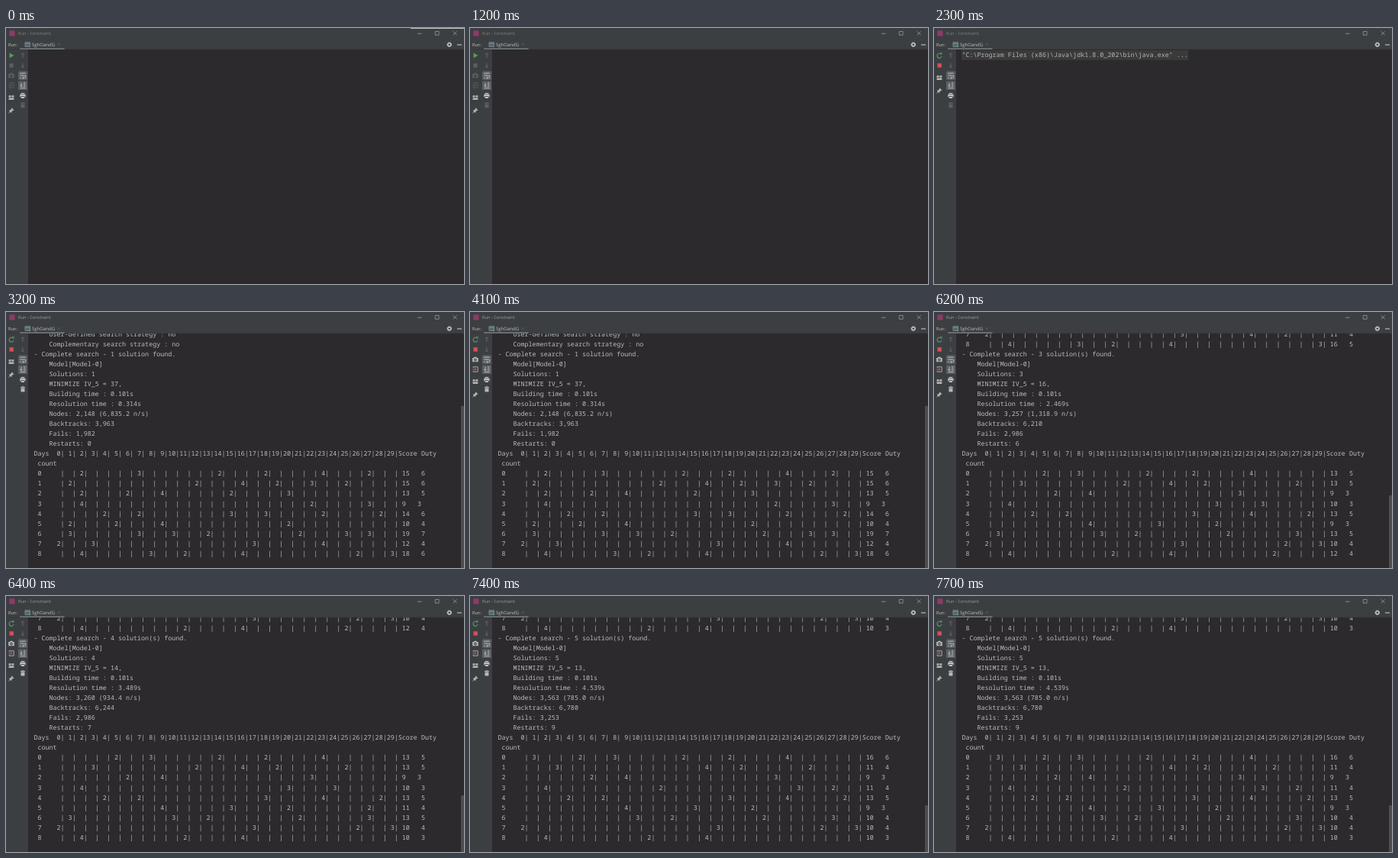
Animation, 600 px wide and 335 px high, one loop 8000 ms. Source, as an HTML page:

```html
<!DOCTYPE html>
<html lang="en">
<head>
<meta charset="utf-8">
<title>Run console</title>
<style>
  html, body { margin: 0; width: 100%; height: 100%; overflow: hidden; background: #3c3f42; }
  #stage { position: relative; width: 600px; height: 335px; overflow: hidden; background: #3c3f42; }
  #console { position: absolute; left: 29px; top: 28px; right: 0; bottom: 0; overflow: hidden; background: #2c2a2c; }
  pre {
    position: absolute; left: 7.4px; margin: 0; color: #bcbcbc;
    font: 8.385px/13.05px "Noto Sans Mono", "DejaVu Sans Mono", monospace;
    font-variant-ligatures: none; text-rendering: geometricPrecision;
  }
  #command { top: .5px; background: #3a3a3b; color: #b4b4b4; }
  .table { top: -5.3px; }
  .thumb { position: absolute; right: 0; bottom: 0; width: 4px; background: #4e4e4f; }
  svg { position: absolute; left: 0; top: 0; }
  text { font-family: "Open Sans", "Noto Sans", sans-serif; text-rendering: geometricPrecision; }
</style>
</head>
<body>
<div id="stage">
  <div id="console">
    <pre id="command" data-from="2300" data-to="3200">"C:\Program Files (x86)\Java\jdk1.8.0_202\bin\java.exe" ...</pre>
  </div>
  <svg width="600" height="335" viewBox="0 0 600 335" fill="none">
    <defs>
      <g id="arrow"><path d="M0 3.2V-3M-2.2 -.8L0 -3.1L2.2 -.8"/></g>
      <g id="camera" stroke="none">
        <path fill="currentColor" fill-rule="evenodd" d="M-3.8 -2h1.8l.8 -1.3h2.4l.8 1.3h1.8v5.2h-7.6zM0 -1.2a1.8 1.8 0 1 0 .01 0z"/>
        <circle cy=".6" r=".8" fill="currentColor"/>
      </g>
      <g id="layout" fill="currentColor" stroke="none">
        <path d="M-3.4 -2.8h3v2.6h-3zM.4 -2.8h3v2.6h-3zM-3.4 .5h6.8v2.5h-6.8z"/>
      </g>
      <g id="pin">
        <path fill="currentColor" stroke="none" d="M.6 -3.5L3.5 -.6L2.6 0L1.8 -.1L.4 1.4V2.6L-.4 3L-3 .4L-2.6 -.4H-1.4L.1 -1.8L0 -2.6z"/>
        <path d="M-1.2 1.2L-3.5 3.5"/>
      </g>
      <g id="frame"><path d="M-2.8 -1.8V-3.2H3.2V3.2H-2.8V1.8"/></g>
      <g id="exit"><path d="M-3.6 0H.8M-1 -1.8L.9 0L-1 1.8"/></g>
      <g id="trash">
        <path fill="currentColor" stroke="none" d="M-2.5 -1.6h5v5h-5zM-3 -3h2v-.7h2v.7h2v.9h-6z"/>
      </g>
    </defs>

    <!-- title bar -->
    <path data-from="0" data-to="1100" d="M530 .5H600" stroke="#c4c4c4"/>
    <rect x="4.5" y="3.5" width="7" height="7" fill="#8f3a68"/>
    <g font-size="5.7">
      <text x="16" y="9.1" fill="#808284" data-from="0" data-to="2700">Run - Constraint</text>
      <text x="16" y="9.1" fill="#999b9d" data-from="2700" data-to="8000">Run - Constraint</text>
      <text x="3" y="23.6" fill="#c0c0c0">Run:</text>
      <text x="34" y="23.7" font-size="6" fill="#c0c0c0">SghOandG</text>
    </g>
    <path d="M539 7.3H544.6M562.3 4.5h4.8v4.8h-4.8zM585.7 4.4l5 5M590.7 4.4l-5 5" stroke="#a2a4a6" stroke-width=".7"/>

    <!-- tab row -->
    <path d="M0 28H600" stroke="#333536" stroke-width=".6"/>
    <path d="M18 27.3H76.5" stroke="#777c80" stroke-width="1.4"/>
    <path d="M25 18.8h6.6v5.6h-6.6zM25 20.4h6.6" fill="#56626b" stroke="#7d8b96" stroke-width=".9"/>
    <circle cx="31" cy="24" r="1.3" fill="#4fa85a" data-from="2300" data-to="8000"/>
    <path d="M67.8 20.2l2.8 2.8M70.6 20.2l-2.8 2.8" stroke="#6d7072" stroke-width=".6"/>
    <circle cx="580.8" cy="21.7" r="2" stroke="#c3c5c7" stroke-width="1.4"/>
    <circle cx="580.8" cy="21.7" r="2.9" stroke="#c3c5c7" stroke-width="1" stroke-dasharray="1.2 1.08"/>
    <path d="M591 22H597" stroke="#c3c5c7" stroke-width="1.1"/>

    <!-- left tool column -->
    <path d="M4.6 32.6L10.4 36L4.6 39.4z" fill="#4ca256" data-from="0" data-to="2300"/>
    <g stroke="#4ca256" stroke-width="1.1" data-from="2300" data-to="8000">
      <path d="M8.6 33.7A3 3 0 1 0 10 37.2"/>
      <path d="M7.6 32.2L10.9 32.6L9.8 35.6z" fill="#4ca256" stroke="none"/>
    </g>
    <rect x="4.5" y="46.5" width="5.2" height="5.2" fill="#5c5f61" data-from="0" data-to="2300"/>
    <rect x="4.5" y="46.3" width="5.4" height="5.4" fill="#d2505a" data-from="2300" data-to="8000"/>
    <g id="tools" stroke="currentColor" stroke-width=".9"></g>

    <!-- right tool column -->
    <g fill="#5b6063">
      <rect x="16" y="56.4" width="12" height="11.6" rx="1"/>
      <rect x="16" y="69.4" width="12" height="11.6" rx="1"/>
    </g>
    <g stroke="#c6c8ca" stroke-width=".9">
      <path d="M18.4 59.2H25.6M18.4 62.2H24.2a1.5 1.5 0 0 1 0 3.2H22M23 64.2L21.6 65.4L23 66.6M18.4 65.4H20"/>
      <path d="M18.6 78.6H25.6M20 72V76.6M18.6 75.2L20 76.8L21.4 75.2M23 72H25.4M23 74.2H25.4M23 76.4H25.4"/>
    </g>
    <path d="M19.4 85h5v1.4h-5zM18.2 86.9h7.4v3.5h-1.2v-1.4h-5v1.4h-1.2zM19.9 89.7h4v2.2h-4z" fill="#c0c2c4"/>
  </svg>
</div>

<script>
const LINE = 13.05, LOOP = 8000;
const stage = document.getElementById('stage');
const consoleBox = document.getElementById('console');

// toolbar icons: name, x, y, colour, from, to
const DIM = '#5c5f61', LIT = '#b4b6b8', RED = '#c9626a';
const icons = [
  ['camera', 7, 62, DIM, 0, 2300], ['frame', 7, 75, DIM, 0, 2300], ['exit', 7, 75, DIM, 0, 2300],
  ['layout', 7, 91, LIT, 0, 2300], ['pin', 7, 108, LIT, 0, 2300],
  ['layout', 7, 65, LIT, 2300, 3700], ['pin', 7, 82, LIT, 2300, 3700],
  ['camera', 7, 62, LIT, 3700, LOOP], ['frame', 7, 75, LIT, 3700, LOOP], ['exit', 7, 75, RED, 3700, LOOP],
  ['layout', 7, 91, LIT, 3700, LOOP], ['pin', 7, 108, LIT, 3700, LOOP],
  ['trash', 22, 101, DIM, 0, 3200], ['trash', 22, 101, LIT, 3200, LOOP],
  ['arrow', 22, 36, '#65686a', 0, LOOP]
];
document.getElementById('tools').innerHTML = icons.map(([name, x, y, color, from, to]) =>
  `<use href="#${name}" transform="translate(${x} ${y})" color="${color}" data-from="${from}" data-to="${to}"/>`
).join('') + '<use href="#arrow" transform="translate(22 49) scale(1 -1)" color="#65686a"/>';

// Duty rosters: each pair is a base-36 day and its weight; later runs list changed rows only
const runs = [
  { at: 3200, goal: 37, time: '0.314', nodes: '2,148 (6,835.2 n/s)', back: '3,963', fails: '1,982', restarts: 0,
    rows: ['22 73 e2 i2 n4 r2', '12 c2 g4 j2 m3 p2', '22 62 94 f2 k3', '24 m2 r3', '42 72 f3 i3 n2 s2',
           '12 52 94 k2', '13 73 a3 d2 l2 p3 r3', '02 33 h3 n4', '24 83 b2 g4 q2 t3'] },
  { at: 4200, goal: 21, time: '1.351', nodes: '2,198 (1,627.4 n/s)', back: '4,134', fails: '1,984', restarts: 2,
    rows: ['22 e2 i2 n4 r2', '33 c2 g4 j2 p2', '62 94 f2 m3', '24 k3 o3', '42 72 d2 i3 n2 s2',
           '52 94 f3 k2', '13 73 a3 l2 r3', '02 h3 n4 q2', '24 83 b2 g4 t3'] },
  { at: 5300, goal: 16, time: '2.469', nodes: '3,257 (1,318.9 n/s)', back: '6,210', fails: '2,986', restarts: 6,
    rows: { 0: '52 83 e2 i2 n4', 1: '33 c2 g4 j2 r2', 2: '62 94 m3', 4: '42 72 i3 n4 s2',
            5: '94 f3 k2', 6: '13 a3 d2 l2 r3', 7: '02 h3 q2 t3', 8: '24 b2 g4 p2' } },
  { at: 6300, goal: 14, time: '3.489', nodes: '3,260 (934.4 n/s)', back: '6,244', fails: '2,986', restarts: 7,
    rows: { 1: '33 c2 g4 j2 p2', 5: '94 f3 k2 r2', 8: '24 b2 g4' } },
  { at: 7400, goal: 13, time: '4.539', nodes: '3,563 (785.0 n/s)', back: '6,780', fails: '3,253', restarts: 9,
    rows: { 0: '13 52 83 e2 i2 n4', 1: '33 g4 j2 p2', 3: '24 c2 o3 r2', 5: '94 f3 k2', 6: 'a3 d2 l2 r3' } }
];

const header = 'Days ' + Array.from({ length: 30 }, (_, d) => String(d).padStart(2) + '|').join('') + 'Score Duty';

function rosterLine(pairs, person) {
  const days = Array(30).fill(' ');
  let score = 0;
  const duties = pairs.split(' ');
  for (const [day, weight] of duties) {
    days[parseInt(day, 36)] = weight;
    score += +weight;
  }
  return ` ${person}   ` + days.map(v => ` ${v}|`).join('') + ` ${score}   ${duties.length}`;
}

function addBlock(tag, className, from, to) {
  const el = document.createElement(tag);
  el.className = className;
  el.dataset.from = from;
  el.dataset.to = to;
  consoleBox.append(el);
  return el;
}

let roster = [];
let tail = ['    User-defined search strategy : no', '    Complementary search strategy : no'];
runs.forEach((run, i) => {
  const n = i + 1, end = runs[n] ? runs[n].at : LOOP;
  roster = Object.assign([...roster], run.rows);
  const table = roster.map(rosterLine);
  const stats = [
    'Model[Model-0]', `Solutions: ${n}`, `MINIMIZE IV_5 = ${run.goal},`,
    'Building time : 0.101s', `Resolution time : ${run.time}s`, `Nodes: ${run.nodes}`,
    `Backtracks: ${run.back}`, `Fails: ${run.fails}`, `Restarts: ${run.restarts}`
  ].map(s => '    ' + s);
  const found = `- Complete search - ${n} solution${i ? '(s)' : ''} found.`;
  addBlock('pre', 'table', run.at, end).textContent =
    [...tail, found, ...stats, header, ' count', ...table].join('\n');
  const content = LINE * (34 + 21 * i);
  addBlock('div', 'thumb', run.at, end).style.height = 307 * 307 / content + 'px';
  tail = table.slice(-2);
});

const timed = [...stage.querySelectorAll('[data-from]')].map(el => ({
  el, from: +el.dataset.from, to: +el.dataset.to
}));

function draw(now) {
  const t = now % LOOP;
  for (const { el, from, to } of timed) {
    el.style.visibility = t >= from && t < to ? 'visible' : 'hidden';
  }
}

const start = performance.now();
function tick() {
  draw(performance.now() - start);
  requestAnimationFrame(tick);
}
tick();
</script>
</body>
</html>
```
